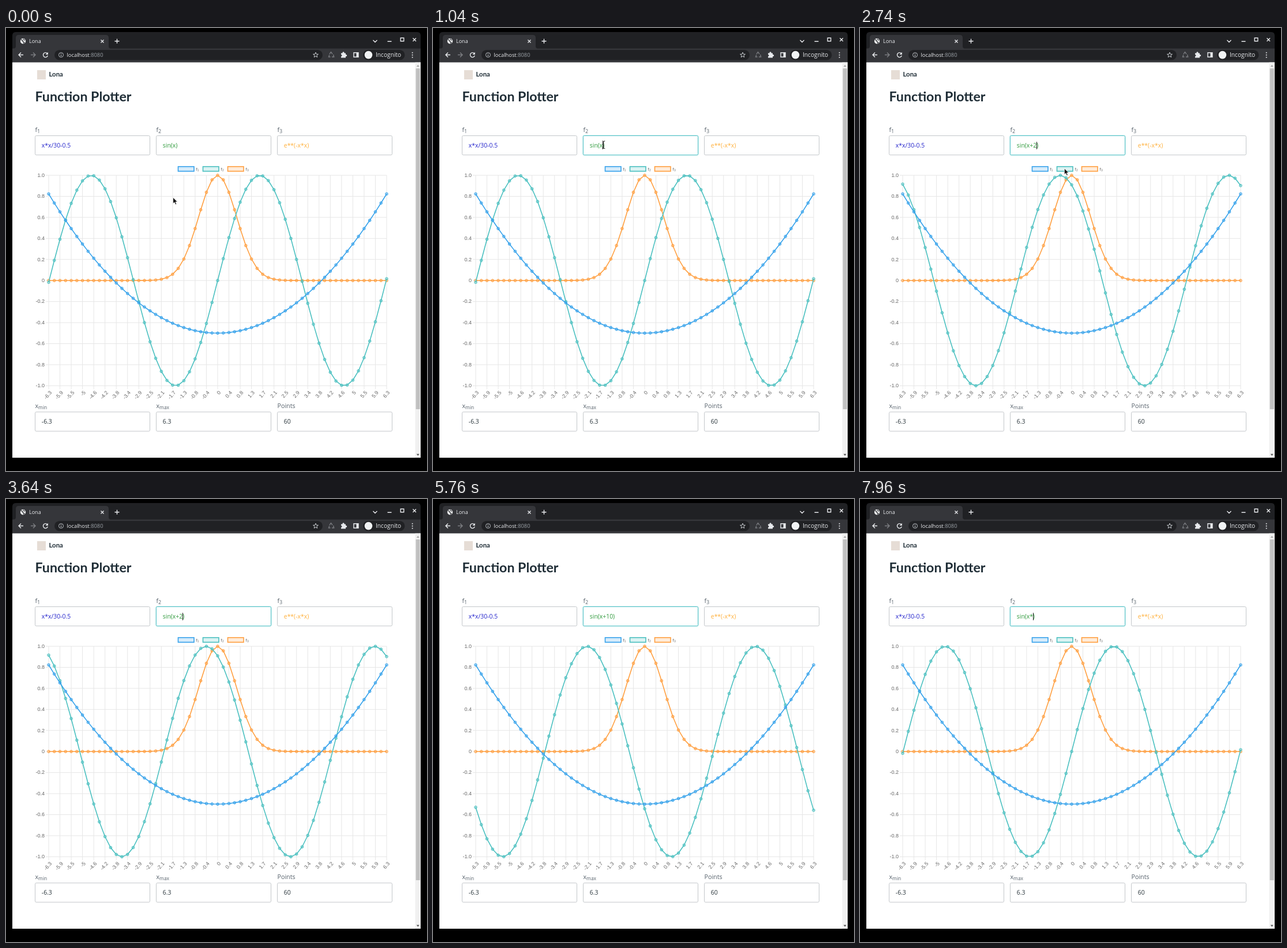
Write an HTML page that moves like this. It is 730 px wide and 767 px high and loops after 8000 ms.

```html
<!DOCTYPE html>
<html lang="en">
<head>
<meta charset="utf-8">
<title>Function Plotter</title>
<style>
  html, body { margin: 0; width: 100%; height: 100%; overflow: hidden; background: #000; }
  svg { display: block; width: 730px; height: 767px; font-family: "Open Sans", "Noto Sans", sans-serif; }
  .head { font-family: Lato, "Open Sans", sans-serif; font-weight: 700; fill: #1f2d36; }
  .label { font-size: 10.7px; fill: #55606a; }
  .sub { font-size: 8.4px; }
  .field { font-size: 10.4px; font-weight: 500; fill: #263238; }
  .box { fill: #fff; stroke: #c3c7ca; }
  .tick { font: 9px "Liberation Sans", Arial, sans-serif; fill: #666; }
  .legend { font: 7.8px "Liberation Sans", "DejaVu Sans", sans-serif; fill: #666; }
  .grid { stroke: #e6e6e6; fill: none; }
  .icon { fill: none; stroke: #e8eaed; stroke-width: 1.4; }
</style>
</head>
<body>
<svg id="stage" viewBox="0 0 730 767">
  <rect width="730" height="767" fill="#000"/>

  <g id="browser">
    <path d="M11 60V13q0-6 6-6h696q6 0 6 6v47z" fill="#202124"/>
    <path d="M11 35.500h2q4 0 4-4V17q0-5 5-5h151q5 0 5 5v14.500q0 4 4 4h537V60H11z" fill="#35363a"/>
    <circle cx="29.500" cy="22.700" r="4.700" fill="#f1f3f4"/>
    <path d="M26 20.500q3 0 3 2t2 2-1 2.500M30.500 18.500q-1 2 2.500 2.500" fill="none" stroke="#35363a" stroke-width="1.300"/>
    <text x="40" y="26" font-size="9" fill="#e8eaed">Lona</text>
    <path class="icon" d="M164.500 20.500l5 5m0-5l-5 5M188.500 22.700h8m-4-4v8"/>
    <path class="icon" d="M636.500 21l3.500 3.500 3.500-3.500M661.500 23.200h7M684.200 17.200h5.600v5.600h-5.600zM705.500 17.500l5.500 5.500m0-5.500l-5.500 5.500"/>

    <rect x="84" y="38" width="465" height="17.500" rx="8.700" fill="#202124"/>
    <path class="icon" d="M30 46.500h-8m4-4l-4 4 4 4"/>
    <path class="icon" d="M43 46.500h8m-4-4l4 4-4 4" style="stroke:#7c7e82"/>
    <path class="icon" d="M71.700 44.200a4 4 0 1 0 .6 3.600"/>
    <path d="M72.800 41.800v4.200h-4.200z" fill="#e8eaed"/>
    <circle class="icon" cx="95.500" cy="46.600" r="4" style="stroke-width:1;stroke:#bdc1c6"/>
    <path d="M95.500 46v3M95.500 44v1.100" stroke="#bdc1c6" stroke-width="1.100"/>
    <text x="105.500" y="50" font-size="9.350" fill="#e8eaed">localhost<tspan fill="#9aa0a6">:8080</tspan></text>
    <path id="star" class="icon" style="stroke-width:1;stroke:#c4c7cb"/>
    <path d="M561 45l2.500-3.500 2.500 3.500M567.500 46l1.200 4h-3.700M562.500 50h-3l1.300-3.600" fill="none" stroke="#7c7e82" stroke-width="1.300"/>
    <path d="M581 43.500h2.500a1.600 1.600 0 1 1 3 0h2.500v2.600a1.600 1.600 0 1 1 0 3v2.400h-8v-2.400a1.500 1.500 0 1 0 0-3z" fill="#e8eaed"/>
    <path class="icon" d="M603 42.700h8v7.600h-8z"/>
    <path d="M607.500 42.500h3.500v8h-3.500z" fill="#e8eaed"/>
    <rect x="619" y="38" width="72.500" height="17.500" rx="8.700" fill="#202124"/>
    <circle cx="628.500" cy="46.600" r="6.800" fill="#f1f3f4"/>
    <text x="641" y="50" font-size="10.200" fill="#e8eaed">Incognito</text>
    <path d="M704.700 42.700h.01M704.700 46.700h.01M704.700 50.700h.01" stroke="#e8eaed" stroke-width="2" stroke-linecap="round"/>
  </g>

  <rect x="11" y="59.500" width="708" height="684.500" fill="#fff"/>
  <rect x="709.500" y="59.500" width="9.500" height="684.500" fill="#f1f1f1"/>
  <rect x="710.700" y="70" width="7.300" height="590" fill="#c1c1c1"/>
  <path d="M711.800 67l2.500-3 2.500 3z" fill="#a3a3a3"/>
  <path d="M711.800 737.500l2.500 3 2.500-3z" fill="#505050"/>

  <rect x="54" y="73" width="15" height="16" fill="#e6ddd6"/>
  <text class="head" x="74.500" y="84" font-size="11.400">Lona</text>
  <text class="head" x="50.500" y="127" font-size="23.200">Function Plotter</text>

  <g id="form"></g>
  <g id="chart"></g>
  <rect id="caret" y="197" width="1" height="13" fill="#222"/>
  <path id="arrow" d="M0 0v10.800l2.500-2.300 1.700 3.900 1.900-.8-1.700-3.800h3.400z" fill="#111" stroke="#fff" stroke-width=".8"/>
  <path id="beam" d="M-2.500-6.500q2 0 2.500 1 .5-1 2.500-1M0-5.500v11M-2.500 6.500q2 0 2.500-1 .5 1 2.500 1" fill="none" stroke="#333" stroke-width="1.100"/>
</svg>
<script>
const LOOP = 8000;
const LEFT = 74, RIGHT = 660, ZERO = 437.2, UNIT = 182.2;
const POINTS = 60, X_MAX = 6.3;
const BLUE = '#36a2eb', TEAL = '#4bc0c0', ORANGE = '#ff9f40';
const $ = id => document.getElementById(id);

function add(parent, tag, attrs, text) {
  const el = document.createElementNS('http://www.w3.org/2000/svg', tag);
  for (const key in attrs) el.setAttribute(key, attrs[key]);
  if (text !== undefined) el.textContent = text;
  parent.appendChild(el);
  return el;
}

// Each list holds [start time, value]; the last one started is current.
const BODY = [[0, 'x'], [2160, 'x+'], [2420, 'x+2'], [4820, 'x+'], [5200, 'x+1'], [5280, 'x+10'],
              [6830, 'x+1'], [7000, 'x+'], [7220, 'x'], [7670, 'x*']];
const COLOR = [[0, '#2f9a3c'], [5060, '#ea3434'], [5530, '#2f9a3c']];
const PHASE = [[0, 0], [2740, 2], [5530, 10], [7580, 0]];
const CARET = [[0, 0], [880, 1], [1510, 0], [2090, 1], [3080, 0], [3640, 1], [4230, 0],
               [4820, 1], [5760, 0], [6340, 1]];

function at(list, t) {
  let value = list[0][1];
  for (const [start, v] of list) if (t >= start) value = v;
  return value;
}

// Form
const COLS = [50.5, 260.5, 470.5];
const form = $('form');

function field(x, y, value, name, sub, color) {
  const label = add(form, 'text', { class: 'label', x, y: y - 7 }, name);
  if (sub) add(label, 'tspan', { class: 'sub', dy: 2.2 }, sub);
  const box = add(form, 'rect', { class: 'box', x, y, width: 199, height: 33.3, rx: 2 });
  const text = add(form, 'text', { class: 'field', x: x + 11.3, y: y + 20.5 }, value);
  if (color) text.style.fill = color;
  return { box, text };
}

field(COLS[0], 186.5, 'x*x/30-0.5', 'f', '1', '#2424cc');
const glow = add(form, 'rect', { x: 260.5, y: 186.5, width: 199, height: 33.3, rx: 2.5,
  fill: 'none', stroke: TEAL, 'stroke-width': 3, opacity: 0.25 });
const active = field(COLS[1], 186.5, 'sin(x)', 'f', '2');
field(COLS[2], 186.5, 'e**(-x*x)', 'f', '3', '#ffb03c');
field(COLS[0], 664.8, '-6.3', 'x', 'min');
field(COLS[1], 664.8, '6.3', 'x', 'max');
field(COLS[2], 664.8, '60', 'Points');

// Chart
const chart = $('chart');
const px = i => LEFT + (RIGHT - LEFT) * i / POINTS;
const py = v => ZERO - UNIT * v;
const xAt = i => -X_MAX + 2 * X_MAX * i / POINTS;

for (let i = 0; i <= POINTS; i += 2) {
  const x = px(i);
  add(chart, 'path', { class: 'grid', d: `M${x} ${py(1)}V${py(-1) + 6}` });
  const name = String(+xAt(i).toFixed(1) || 0);
  add(chart, 'text', { class: 'tick', 'text-anchor': 'end', dy: '.35em',
    transform: `translate(${x + 3.5} 629.500) rotate(-49)` }, name);
}
for (let k = -5; k <= 5; k++) {
  const y = py(k / 5);
  add(chart, 'path', { class: 'grid', d: `M${LEFT - 5} ${y}H${RIGHT}` });
  add(chart, 'text', { class: 'tick', x: 67, y: y + 2.8, 'text-anchor': 'end' }, k ? (k / 5).toFixed(1) : '0');
}

[BLUE, TEAL, ORANGE].forEach((color, i) => {
  const x = 298.5 + 43 * i;
  add(chart, 'rect', { x, y: 240, width: 27.5, height: 8, fill: color, 'fill-opacity': 0.2,
    stroke: color, 'stroke-width': 1.6 });
  add(chart, 'text', { class: 'legend', x: x + 31, y: 246.5 }, 'f' + '₁₂₃'[i]);
});

function series(color) {
  const line = add(chart, 'path', { fill: 'none', stroke: color, 'stroke-width': 1.6, 'stroke-linejoin': 'round' });
  const dots = add(chart, 'path', { fill: color, 'fill-opacity': 0.4, stroke: color, 'stroke-width': 1 });
  return fn => {
    let path = '', rings = '';
    for (let i = 0; i <= POINTS; i++) {
      const x = px(i), y = py(fn(xAt(i)));
      path += `${i ? 'L' : 'M'}${x} ${y}`;
      rings += `M${x - 2.3} ${y}a2.300 2.300 0 1 0 4.600 0a2.300 2.300 0 1 0 -4.600 0z`;
    }
    line.setAttribute('d', path);
    dots.setAttribute('d', rings);
  };
}

series(ORANGE)(x => Math.exp(-x * x));
const drawSine = series(TEAL);
series(BLUE)(x => x * x / 30 - 0.5);

const star = Array.from({ length: 10 }, (_, i) => {
  const r = i % 2 ? 2 : 4.7, a = (i / 5 - 0.5) * Math.PI;
  return `${537 + r * Math.cos(a)} ${46.8 + r * Math.sin(a)}`;
});
$('star').setAttribute('d', 'M' + star.join('L') + 'z');

function pointer(t) {
  if (t >= 1190) return [354.3, 243];
  if (t >= 1120) return [331, 227];
  const step = t < 90 ? 0 : Math.min(9, 1 + Math.floor((t - 90) / 78.7));
  const p = step / 9, e = p * p * (3 - 2 * p);
  return [289.6 + 6.2 * e, 293.3 - 91 * e];
}

let lastPhase = null;

function render(t) {
  const phase = at(PHASE, t);
  if (phase !== lastPhase) drawSine(x => Math.sin(x + phase));
  lastPhase = phase;

  const value = `sin(${at(BODY, t)})`;
  if (active.text.textContent !== value) active.text.textContent = value;
  active.text.style.fill = at(COLOR, t);

  const focused = t >= 880;
  active.box.style.stroke = focused ? '#56c3c8' : '';
  glow.style.display = focused ? '' : 'none';

  const caret = $('caret');
  caret.style.display = at(CARET, t) ? '' : 'none';
  caret.setAttribute('x', Math.round(271.8 + active.text.getSubStringLength(0, value.length - 1)));

  const [x, y] = pointer(t);
  const inField = y > 187 && y < 220;
  const shown = t < 3150;
  for (const [id, on] of [['arrow', !inField], ['beam', inField]]) {
    $(id).style.display = shown && on ? '' : 'none';
    $(id).setAttribute('transform', `translate(${x} ${y})`);
  }
}

const start = performance.now();
function tick(now) {
  render(Math.max(0, now - start) % LOOP);
  requestAnimationFrame(tick);
}
render(0);
requestAnimationFrame(tick);
</script>
</body>
</html>
```
